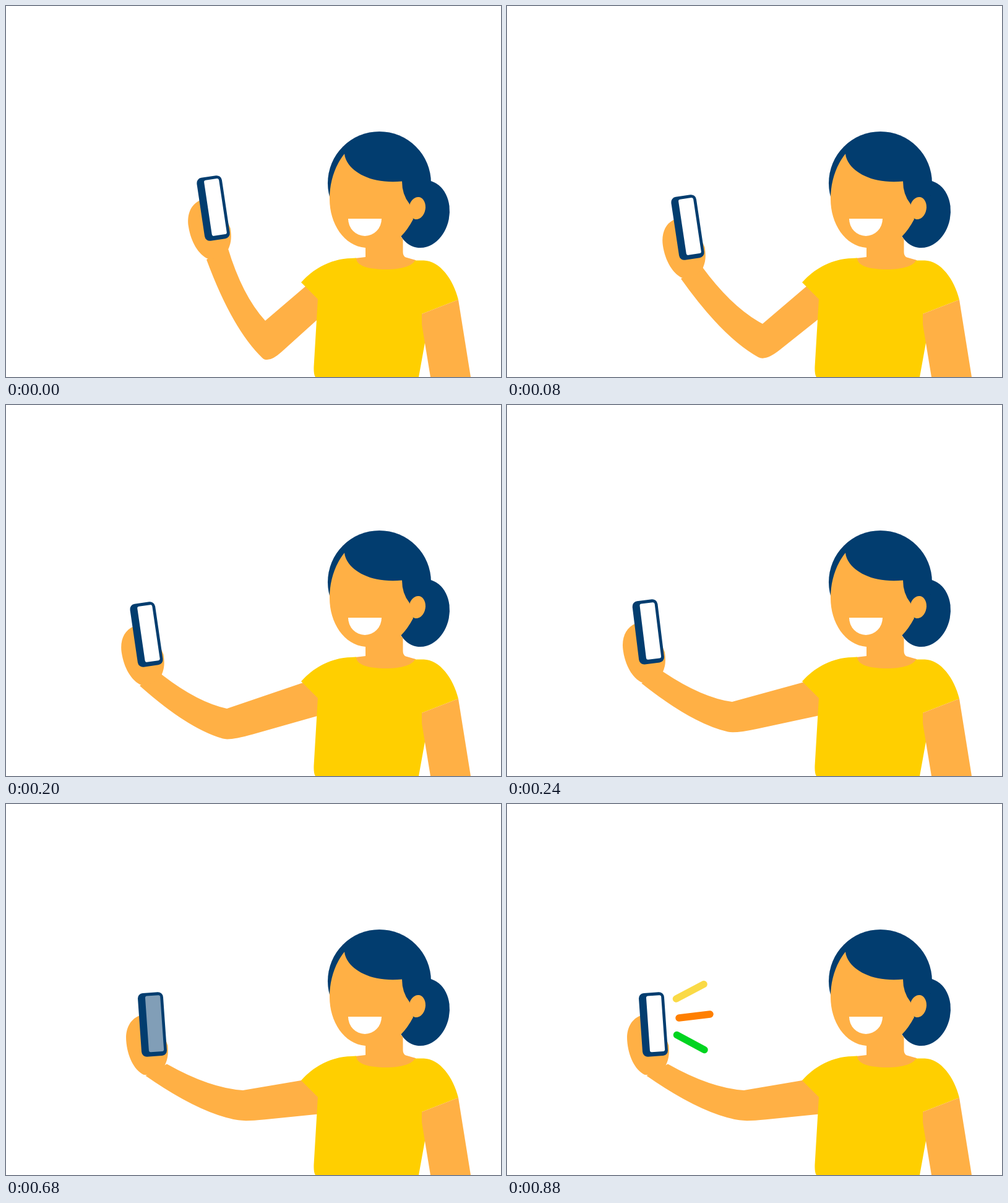
These frames come from a looping animation (800 by 600 pixels, 2.16 s). An HTML page:

```html
<!DOCTYPE html>
<html lang="en">
<head>
<meta charset="utf-8">
<title>Selfie</title>
<style>
  html, body { margin: 0; width: 100%; height: 100%; overflow: hidden; background: #fff; }
  svg { display: block; width: 800px; height: 600px; }
  .skin { fill: #ffb045; }
  .navy { fill: #023d6f; }
  .shirt { fill: #ffcf00; }
  #rays { fill: none; stroke-width: 11.5; stroke-linecap: round; }
</style>
</head>
<body>
<svg viewBox="0 0 800 600">
  <!-- head -->
  <ellipse class="navy" cx="673.5" cy="336.5" rx="43" ry="55" transform="rotate(11 673.5 336.5)"/>
  <circle class="navy" cx="603.5" cy="286.5" r="83.5"/>
  <path class="skin" d="M547 239C531 259 523 285 523 312C523 352 546 388 581 391V430H662V411
    C650 411 641.5 407 641.5 398V377L638 373Q649 362 658 345L652 320Q640 305 640 283.5C582 289 549 262 547 239Z"/>
  <ellipse class="skin" cx="664.5" cy="327" rx="13.3" ry="18.2" transform="rotate(10 664.5 327)"/>
  <path fill="#fff" d="M553 344H607A27 28 0 0 1 553 344Z"/>

  <!-- raised arm, hand and phone -->
  <path id="arm" class="skin"/>
  <g id="hand">
    <path class="skin" d="M-18 -16C-35 -12 -44 4 -44 23C-44 48 -35 71 -20 80
      C-10 83 8 78 15 68C21 58 22.5 50 22.5 36L10 -10Z"/>
    <rect class="navy" x="-20.5" y="-51.5" width="41" height="103" rx="8.5"/>
    <rect id="screen" x="-8.5" y="-46.5" width="24.3" height="91" rx="3" fill="#fff"/>
  </g>

  <!-- body -->
  <path class="skin" d="M564 408L581 406V391H641V405L662 411L650 430H575Z"/>
  <path class="shirt" d="M477 447C500 421 530 408.5 558 408L566 407.5C566 420 585 426 614 426
    C640 426 657 420 661 411.5H675C701 412 723 442 731 475L672 498L680 528L667 600H500
    Q497 596 497.5 583L504 474Z"/>
  <path class="skin" d="M672 498L731 475L751 600H686L672 515Z"/>

  <g id="rays">
    <path stroke="#fada46" d="M273.5 315L318 291.5"/>
    <path stroke="#ff7f00" d="M278 346L328 340"/>
    <path stroke="#00d420" d="M274.5 373.5L319 397.5"/>
  </g>
</svg>
<script>
  const LOOP = 2160, STEP = 40;
  const ARM_WIDTH = 50, SAG = 0.11;
  const SHOULDER = [495, 444], ARMPIT = [510, 501];
  const byId = id => document.getElementById(id);
  const arm = byId('arm'), hand = byId('hand'), screen = byId('screen'), rays = byId('rays');

  // time, then phone x, y, tilt and crook of the elbow x, y
  const keys = [
    [0, 335, 327, -8.5, 419, 509],
    [80, 292, 358, -8.5, 413, 514],
    [120, 249.5, 360, -5.8, 382, 504],
    [200, 227, 371, -8.3, 357, 491],
    [320, 236.5, 356.5, -4, 383, 463]
  ];
  const last = keys.length - 1;

  function slope(i, k) {
    if (i === 0 || i === last) return 0;
    const a = keys[i - 1], b = keys[i + 1];
    return (b[k] - a[k]) / (b[0] - a[0]);
  }

  // Smooth curve through the keys, at rest at both ends
  function poseAt(t) {
    if (t >= keys[last][0]) return keys[last];
    const i = keys.findIndex(key => key[0] > t) - 1, next = keys[i + 1];
    const h = next[0] - keys[i][0], u = (t - keys[i][0]) / h, v = 1 - u;
    return keys[i].map((a, k) =>
      a * v * v * (1 + 2 * u) + next[k] * u * u * (3 - 2 * u) +
      h * u * v * (v * slope(i, k) - u * slope(i + 1, k)));
  }

  const mix = (a, b, f) => [a[0] + (b[0] - a[0]) * f, a[1] + (b[1] - a[1]) * f];

  // Control point that lets the forearm hang below a straight line
  function sag(a, b) {
    const [x, y] = mix(a, b, 0.6);
    return [x - (b[1] - a[1]) * SAG, y + (b[0] - a[0]) * SAG];
  }

  function direction(a, b) {
    const dx = b[0] - a[0], dy = b[1] - a[1], d = Math.hypot(dx, dy);
    return [dx / d, dy / d];
  }

  function armPath(x, y, crook) {
    const under = [x - 11, y + 83], over = [x + 23.5, y + 64];
    const overBend = sag(over, crook);
    // The tighter the bend, the further the elbow sticks out
    const u = direction(crook, SHOULDER), v = direction(crook, overBend);
    const drop = 2 * ARM_WIDTH / Math.hypot(u[0] - v[0], u[1] - v[1]);
    const elbow = [crook[0] + 5, crook[1] + drop];
    const underBend = sag(under, elbow);
    return `M${under}Q${underBend} ${mix(elbow, underBend, 0.17)}` +
      `Q${elbow} ${mix(elbow, ARMPIT, 0.25)}L${ARMPIT}L530 460L${SHOULDER}` +
      `L${crook}Q${overBend} ${over}Z`;
  }

  function draw(ms) {
    const t = Math.floor(ms % LOOP / STEP) * STEP;
    const [, x, y, tilt, ...crook] = poseAt(t);
    hand.setAttribute('transform', `translate(${x} ${y}) rotate(${tilt})`);
    arm.setAttribute('d', armPath(x, y, crook));

    // The screen blinks, then the rays pop out
    screen.setAttribute('fill-opacity', Math.min(1, Math.abs(t - 720) / 80));
    rays.setAttribute('visibility', t >= 880 ? 'visible' : 'hidden');
  }

  const start = performance.now();
  function tick() {
    draw(performance.now() - start);
    requestAnimationFrame(tick);
  }
  tick();
</script>
</body>
</html>
```
